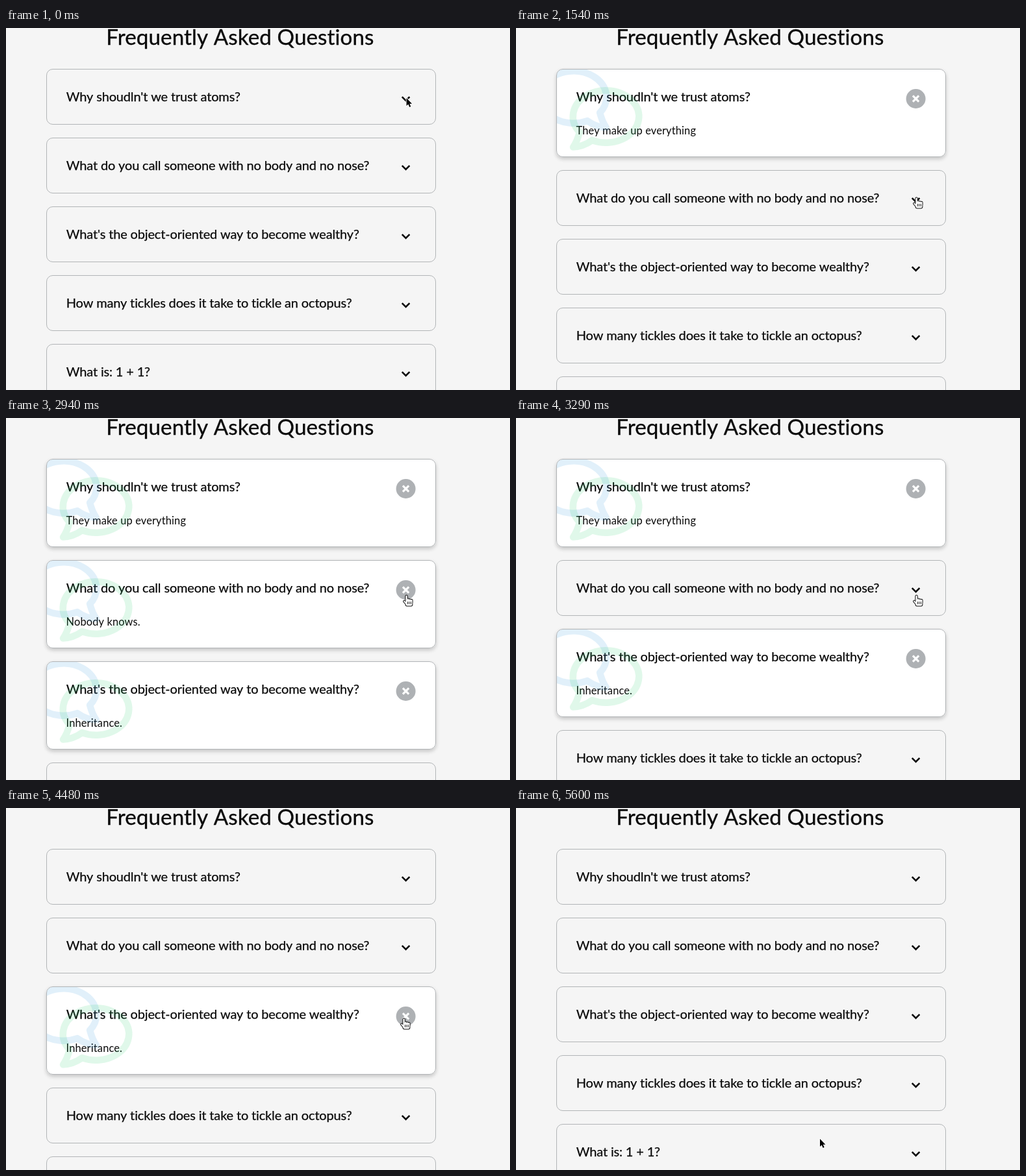
Animation of 776x558 px, one loop 5670 ms. Source, as an HTML page with a canvas:

```html
<!DOCTYPE html>
<html lang="en">
<head>
<meta charset="utf-8">
<title>FAQ</title>
<style>
  html, body { margin: 0; width: 100%; height: 100%; overflow: hidden; background: #f5f5f5; }
  canvas { display: block; width: 776px; height: 558px; }
</style>
</head>
<body>
<canvas id="stage" width="776" height="558"></canvas>
<script>
const ctx = document.getElementById('stage').getContext('2d');
const LOOP = 5670, FADE = 300, TRAVEL = 560, PAUSE = 140;
const CARD = { x: 62, top: 63, w: 600, closed: 86, open: 136, gap: 20 };
const TOGGLE = { x: 615.6, dy: 46, r: 15 };
const INK = '#0a0a0a';

const cards = [
  { q: "Why shoudln't we trust atoms?", a: 'They make up everything' },
  { q: 'What do you call someone with no body and no nose?', a: 'Nobody knows.' },
  { q: "What's the object-oriented way to become wealthy?", a: 'Inheritance.' },
  { q: 'How many tickles does it take to tickle an octopus?' },
  { q: 'What is: 1 + 1?' }
];

// The pointer visits card toggles; dx and dy are offsets from the toggle centre.
const visits = [
  { card: 0, arrive: 0, click: 350, dx: 1, dy: -1 },
  { card: 1, arrive: 1510, click: 1680, dx: 1, dy: -4 },
  { card: 2, arrive: 2240, click: 2450, dx: 2, dy: -2 },
  { card: 1, arrive: 2910, click: 3080, dx: 1, dy: 8 },
  { card: 0, arrive: 3920, click: 4060, dx: -6, dy: 3 },
  { card: 2, arrive: 4480, click: 5110, dx: -3, dy: 3 }
];

const smooth = p => p * p * (3 - 2 * p);
const clamp = p => Math.max(0, Math.min(1, p));
const mix = (a, b, p) => a + (b - a) * p;

function cardState(index, t) {
  const past = visits.filter(v => v.card === index && v.click <= t);
  if (!past.length) return { open: false, glow: 0 };
  const open = past.length % 2 === 1;
  const p = 1 - (1 - clamp((t - past.at(-1).click) / FADE)) ** 2.5;
  return { open, glow: open ? p : 1 - p };
}

const cardHeight = (index, t) => cardState(index, t).open ? CARD.open : CARD.closed;

function cardTop(index, t) {
  let y = CARD.top;
  for (let i = 0; i < index; i++) y += cardHeight(i, t) + CARD.gap;
  return y;
}

const stops = visits.map(v => ({
  arrive: v.arrive,
  leave: v.click + PAUSE,
  x: TOGGLE.x + v.dx,
  y: cardTop(v.card, v.click - 1) + TOGGLE.dy + v.dy
}));
stops.push({ arrive: 5600, leave: LOOP, x: 468, y: 510 });

function pointerAt(t) {
  let { x, y } = stops[0];
  for (let i = 1; i < stops.length; i++) {
    const s = stops[i];
    const begin = Math.max(stops[i - 1].leave, s.arrive - TRAVEL);
    const p = smooth(clamp((t - begin) / (s.arrive - begin)));
    x = mix(x, s.x, p);
    y = mix(y, s.y, p);
  }
  return { x, y };
}

function text(str, x, y, size, spacing, weight) {
  ctx.font = `400 ${size}px Lato, sans-serif`;
  ctx.letterSpacing = spacing + 'px';
  ctx.fillStyle = ctx.strokeStyle = INK;
  ctx.fillText(str, x, y);
  if (!weight) return;
  ctx.lineWidth = weight;
  ctx.lineJoin = 'round';
  ctx.strokeText(str, x, y);
}

function bubble(x, y, flip, color) {
  ctx.save();
  ctx.translate(x + 56, y);
  if (flip) ctx.scale(-1, 1);
  ctx.beginPath();
  ctx.ellipse(0, 52.5, 50.75, 40.25, 0, 2.5, 2 + Math.PI * 2);
  ctx.quadraticCurveTo(-35, 99, -50.5, 99.6);
  ctx.quadraticCurveTo(-44, 90, -40.6, 76.5);
  ctx.closePath();
  ctx.globalAlpha = 0.145;
  ctx.strokeStyle = color;
  ctx.lineWidth = 10.5;
  ctx.lineJoin = 'round';
  ctx.stroke();
  ctx.restore();
}

function outline(y, h, inset) {
  ctx.beginPath();
  ctx.roundRect(CARD.x + inset, y + inset, CARD.w - 2 * inset, h - 2 * inset, 10 - inset);
}

function box(y, h, glow) {
  if (glow > 0) {
    const tone = mix(245, 255, glow);
    ctx.save();
    ctx.fillStyle = `rgb(${tone} ${tone} ${tone})`;
    ctx.shadowColor = `rgba(0, 0, 0, ${0.1 * glow})`;
    ctx.shadowBlur = 6;
    ctx.shadowOffsetY = 3;
    outline(y, h, 0);
    ctx.fill();
    ctx.fill();
    ctx.restore();
  }
  outline(y, h, 0.5);
  ctx.strokeStyle = '#b2b5b7';
  ctx.lineWidth = 1;
  ctx.stroke();
}

function toggle(y, open) {
  ctx.save();
  ctx.translate(TOGGLE.x, y + TOGGLE.dy);
  ctx.lineJoin = 'miter';
  ctx.beginPath();
  if (open) {
    ctx.arc(0, 0, TOGGLE.r, 0, Math.PI * 2);
    ctx.fillStyle = '#aeb1b4';
    ctx.fill();
    ctx.beginPath();
    for (const s of [1, -1]) {
      ctx.moveTo(-4.6, -4.6 * s);
      ctx.lineTo(4.6, 4.6 * s);
    }
    ctx.strokeStyle = '#fff';
    ctx.lineWidth = 3.2;
  } else {
    for (const s of [-1, 0, 1]) ctx.lineTo(5.8 * s, 3 - 5.8 * Math.abs(s));
    ctx.strokeStyle = INK;
    ctx.lineWidth = 2.6;
  }
  ctx.stroke();
  ctx.restore();
}

function drawCard(index, t) {
  const { q, a } = cards[index];
  const { open, glow } = cardState(index, t);
  const y = cardTop(index, t);
  const h = cardHeight(index, t);
  box(y, h, glow);
  text(q, 92.8, y + 50, 20, -0.155, 0.25);
  if (open) {
    text(a, 92.6, y + 101, 16.4, 0.15, 0);
    ctx.save();
    outline(y, h, 1);
    ctx.clip();
    bubble(CARD.x - 29.5, y - 9, true, '#3498db');
    bubble(CARD.x + 20.5, y + 21, false, '#2ecc71');
    ctx.restore();
  }
  toggle(y, open);
}

function arrow() {
  const shape = new Path2D('M0 0V12L2.7 9.4L4.7 14L6.7 13.1L4.8 8.7H8.5Z');
  ctx.strokeStyle = '#fff';
  ctx.lineWidth = 1.8;
  ctx.stroke(shape);
  ctx.fillStyle = '#000';
  ctx.fill(shape);
}

function hand() {
  const shape = new Path2D();
  for (let i = 0; i < 4; i++) {
    const top = i ? 5 + i * 0.6 : 0.5;
    shape.roundRect(-1.2 + i * 2.6, top, 2.4, 13 - top, 1.2);
  }
  shape.roundRect(-1, 8, 9.8, 8.5, 2);
  const thumb = new Path2D('M-3.4 9.6L0 13.5');
  ctx.lineCap = 'round';
  ctx.strokeStyle = '#111';
  ctx.lineWidth = 2;
  ctx.stroke(shape);
  ctx.lineWidth = 4;
  ctx.stroke(thumb);
  ctx.strokeStyle = ctx.fillStyle = '#fff';
  ctx.lineWidth = 2;
  ctx.stroke(thumb);
  ctx.fill(shape);
  ctx.fillStyle = '#111';
  for (let i = 0; i < 3; i++) ctx.fillRect(1.4 + i * 2.4, 10, 0.9, 4);
}

function draw(t) {
  ctx.fillStyle = '#f5f5f5';
  ctx.fillRect(0, 0, 776, 558);
  text('Frequently Asked Questions', 154.3, 25.5, 33.2, 0.08, 0.35);

  const tip = pointerAt(t);
  const overToggle = cards.some((_, i) =>
    Math.hypot(tip.x - TOGGLE.x, tip.y - cardTop(i, t) - TOGGLE.dy) < TOGGLE.r);
  cards.forEach((_, i) => drawCard(i, t));

  ctx.save();
  ctx.translate(tip.x, tip.y);
  ctx.lineJoin = 'round';
  if (overToggle && t >= visits[0].click) hand();
  else arrow();
  ctx.restore();
}

const start = performance.now();
function tick() {
  draw((performance.now() - start) % LOOP);
  requestAnimationFrame(tick);
}
tick();
</script>
</body>
</html>
```
